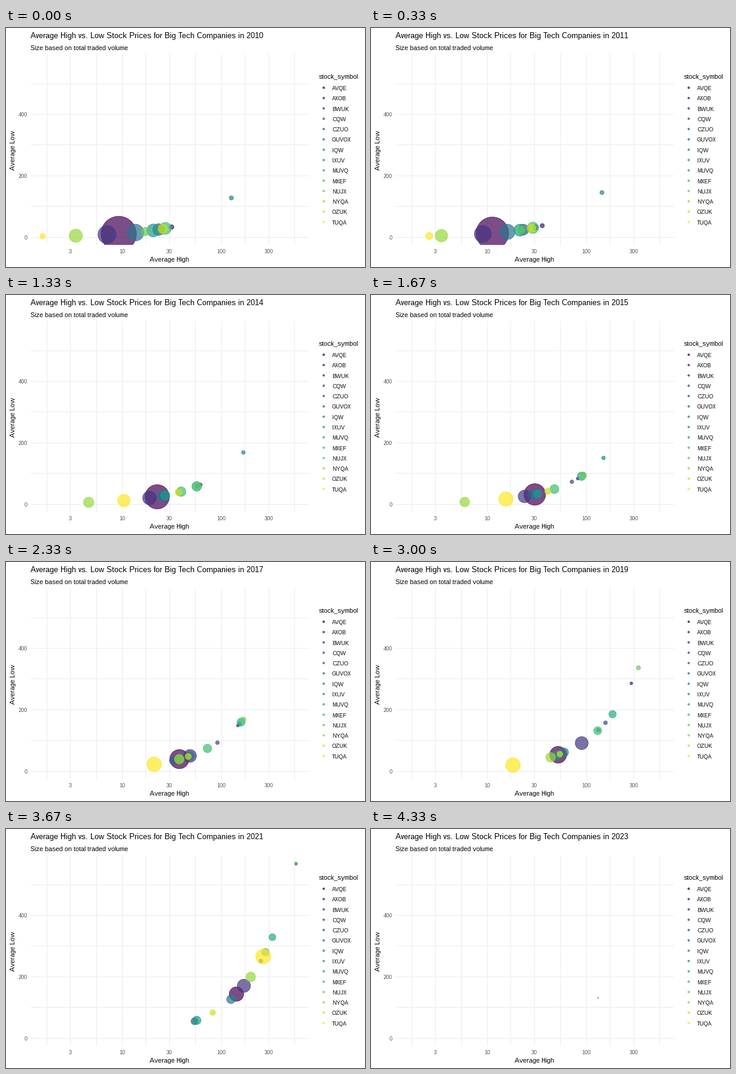
These frames come from a looping animation (600x400 px, 4.67 s). A matplotlib script:

```python
import numpy as np
import matplotlib.pyplot as plt
from matplotlib.animation import FuncAnimation
from matplotlib.patches import Rectangle

plt.rcParams.update({"font.family": "Liberation Sans",
                     "text.hinting": "native", "text.hinting_factor": 1})

W, H, DPI = 600, 400, 100
PX = 72 / DPI  # points per pixel
FIRST_YEAR, LAST_FULL_YEAR = 2010, 2022
LOOP_MS, STEP_MS, YEARS_PER_S = 4670, 10, 3
LEFT, RIGHT, TOP, BOTTOM = 41, 506, 43, 363
LOW_RATIO = 0.994  # average low relative to average high
MIN_SIZE = 2.6
HIGH_KEYS = (2010, 2013, 2015, 2017, 2019, 2021)
SIZE_KEYS = (2010, 2015, 2021)


class Stock:
    """Price runs log-linearly and bubble diameter linearly between key years."""

    def __init__(self, symbol, highs, sizes, first=FIRST_YEAR, last=LAST_FULL_YEAR):
        self.symbol, self.first, self.last = symbol, first, last
        self.log_highs, self.sizes = np.log(highs), sizes

    def active(self, year):
        return self.first <= year <= self.last

    def high(self, year):
        return np.exp(np.interp(year, HIGH_KEYS, self.log_highs))

    def size(self, year):
        if year > LAST_FULL_YEAR:  # hardly any volume traded yet
            return MIN_SIZE
        return np.interp(year, SIZE_KEYS, self.sizes)


stocks = [
    Stock("AVQE", (9.33, 17, 30.5, 38.1, 52.4, 143), (60, 37, 25)),
    Stock("AXOB", (31.8, 47, 82.5, 148, 286, 569), (8.7, 5.7, 5.5)),
    Stock("BWUK", (7.1, 15.1, 24, 48.7, 90.5, 170), (31, 22, 23)),
    Stock("CQW", (25.5, 46.5, 72, 92, 157, 251), (11, 7, 7.5)),
    Stock("CZUO", (23.5, 23.1, 28.3, 33, 51.6, 54), (20.5, 14, 12.5)),
    Stock("GUVOX", (13.75, 22.2, 31, 48, 60, 126), (29, 17, 15.5)),
    Stock("IQW", (127, 188, 150, 153, 133, 132), (8, 7, 7), last=2023),
    Stock("IXUV", (20.8, 23.2, 32.4, 38, 51.6, 57), (22.5, 15, 15)),
    Stock("MUVQ", (12.8, 36, 90, 159, 185, 329), (25, 15, 12.5), first=2012),
    Stock("MXEF", (27.5, 32.8, 48, 73, 131, 280), (21, 16, 13.5)),
    Stock("NUJX", (17.3, 36, 93.5, 167, 337, 570), (15, 12, 6)),
    Stock("NYQA", (3.45, 3.6, 6, 38, 44, 199), (23, 17, 17)),
    Stock("OZUK", (25.8, 33.8, 41.2, 46.8, 54.5, 82.5), (16, 11.5, 10)),
    Stock("TUQA", (1.6, 7.1, 15.6, 21.2, 18.4, 266), (10, 25, 26)),
]
colors = plt.cm.viridis(np.linspace(0, 1, len(stocks)), alpha=0.7)


def x_pos(high):
    return 193.4 + 165.97 * (np.log10(high) - 1)


def y_pos(low):
    return 349.4 - 0.5147 * low


def marker_area(diameter):
    """Scatter size whose outer edge, with a 1 px rim, has this diameter."""
    return ((np.asarray(diameter) - 1) * PX) ** 2


fig = plt.figure(figsize=(W / DPI, H / DPI), dpi=DPI, facecolor="white")
ax = fig.add_axes([0, 0, 1, 1])
ax.set(xlim=(0, W), ylim=(H, 0))
ax.axis("off")


def label(x, y, text, size, color="black", **kw):
    return ax.text(x, y, text, fontsize=size * PX, color=color,
                   va="baseline", **kw)


# Grid and axis labels
grid = dict(colors="#EBEBEB", linewidths=PX, zorder=0)
major_x = [3, 10, 30, 100, 300]
minor_x = np.sqrt(3 * 10.0 ** np.arange(6))
ax.vlines(np.floor(x_pos(np.append(major_x, minor_x))) + 0.5, TOP, BOTTOM, **grid)
ax.hlines(np.floor(y_pos(np.arange(0, 600, 100))) + 0.5, LEFT, RIGHT, **grid)
for v in major_x:
    label(x_pos(v) + 0.5, 377, str(v), 9, "#4D4D4D", ha="center")
for v in (0, 200, 400):
    label(36, np.floor(y_pos(v)) + 5, str(v), 9, "#4D4D4D", ha="right")

title = label(41, 17, "", 13)
label(41, 37, "Size based on total traded volume", 11)
label(273, 391, "Average High", 11, ha="center")
label(15, 204, "Average Low", 11, ha="center", rotation=90,
      rotation_mode="anchor")

# Legend
label(523, 85, "stock_symbol", 11)
rows = 100 + 17.28 * np.arange(len(stocks))
ax.scatter(np.full(len(stocks), 531), rows, s=marker_area(4), c=colors,
           linewidths=PX)
for s, y in zip(stocks, rows):
    label(545, np.round(y + 4), s.symbol, 9)

bubbles = ax.scatter([], [], linewidths=PX, zorder=2)
bubbles.set_clip_path(Rectangle((LEFT, TOP), RIGHT - LEFT, BOTTOM - TOP,
                                transform=ax.transData))


def update(i):
    # Years switch on the nearest whole step
    year = FIRST_YEAR + int((i + 0.5) * STEP_MS * YEARS_PER_S / 1000)
    shown = [s for s in stocks if s.active(year)]
    shades = [c for s, c in zip(stocks, colors) if s.active(year)]
    highs = np.array([s.high(year) for s in shown])
    bubbles.set_offsets(np.column_stack([x_pos(highs), y_pos(highs * LOW_RATIO)]))
    bubbles.set_sizes(marker_area([s.size(year) for s in shown]))
    bubbles.set_facecolor(shades)
    bubbles.set_edgecolor(shades)
    title.set_text("Average High vs. Low Stock Prices for "
                   f"Big Tech Companies in {year}")
    return bubbles, title


anim = FuncAnimation(fig, update, frames=LOOP_MS // STEP_MS, interval=STEP_MS,
                     init_func=lambda: update(0), repeat=True, repeat_delay=0)
plt.show()
```
